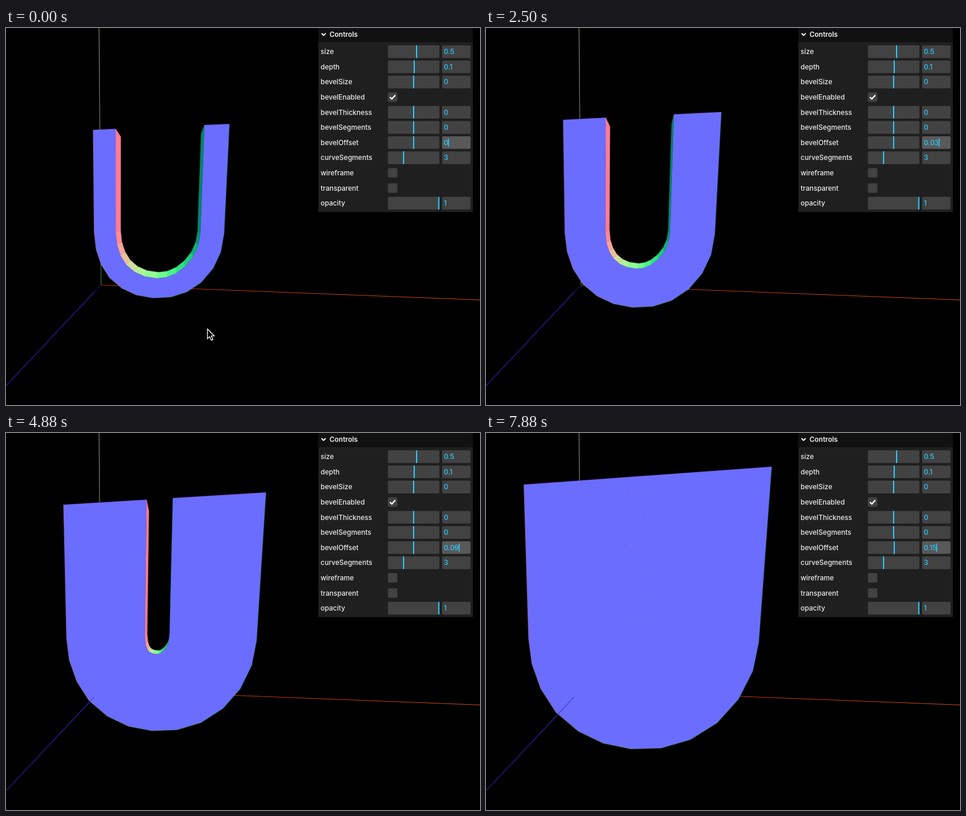
An HTML page with a canvas that plays this animation: 800 px wide and 637 px high, repeating every 8 s.

```html
<!DOCTYPE html>
<html lang="en">
<head>
<meta charset="utf-8">
<title>Bevel offset</title>
<style>
  html, body { margin: 0; width: 100%; height: 100%; overflow: hidden; background: #000; }
  canvas { display: block; }
</style>
</head>
<body>
<canvas id="stage" width="800" height="637"></canvas>
<script>
const ctx = document.getElementById('stage').getContext('2d');
const LOOP = 8000, FIRST_STEP = 1250, STEP = 441, DEPTH = 0.1;

// Camera: world axes and origin in view space (x right, y down, z away)
const AX = [0.986, 0.024, -0.165], AY = [0, -0.99, -0.1436], AZ = [-0.1635, 0.1417, -0.976];
const ORIGIN = [-0.0563, 0.096, 1.12], FOCAL = 537, CENTER = [187, 388];

function project([x, y], z) {
  const [a, b, c] = ORIGIN.map((o, i) => o + x * AX[i] + y * AY[i] + z * AZ[i]);
  return [CENTER[0] + FOCAL * a / c, CENTER[1] + FOCAL * b / c];
}

// Glyph outline, counter-clockwise, three segments per curve
const TOP = 0.4973;
const glyph = [[0.0022, TOP], [0.0022, 0.192]];
function curve(cx, cy, x, y) {
  const [px, py] = glyph[glyph.length - 1];
  for (let i = 1; i <= 3; i++) {
    const t = i / 3, s = 1 - t;
    glyph.push([s * s * px + 2 * s * t * cx + t * t * x, s * s * py + 2 * s * t * cy + t * t * y]);
  }
}
curve(0.0032, 0.105, 0.051, 0.048);
curve(0.106, -0.0095, 0.188, -0.011);
curve(0.276, -0.0125, 0.333, 0.045);
curve(0.391, 0.1055, 0.3917, 0.193);
glyph.push([0.3917, TOP]);
const INNER = glyph.length;
glyph.push([0.3246, TOP], [0.3246, 0.192]);
curve(0.3235, 0.134, 0.284, 0.092);
curve(0.246, 0.052, 0.2, 0.0515);
curve(0.138, 0.052, 0.1035, 0.0915);
curve(0.0715, 0.13, 0.0702, 0.192);
glyph.push([0.0702, TOP]);

const COUNT = glyph.length;
const normals = glyph.map(([x, y], i) => {
  const [nx, ny] = glyph[(i + 1) % COUNT];
  const len = Math.hypot(nx - x, ny - y);
  return [(ny - y) / len, (x - nx) / len];
});

function offsetGlyph(d) {
  return glyph.map(([x, y], i) => {
    const a = normals[(i + COUNT - 1) % COUNT], b = normals[i];
    const k = d / (1 + a[0] * b[0] + a[1] * b[1]);
    return [x + k * (a[0] + b[0]), y + k * (a[1] + b[1])];
  });
}

// View-space normal shown as a colour
function normalColor([x, y], sign) {
  const rgb = [0, 1, 2].map(i => {
    const v = (x * AX[i] + y * AY[i]) * sign * (i ? -1 : 1);
    return Math.round(127.5 + 127.5 * v);
  });
  return `rgb(${rgb})`;
}

function trace(points, close) {
  ctx.beginPath();
  points.forEach(p => ctx.lineTo(...p));
  if (close) ctx.closePath();
}

function line(from, to, width, color) {
  trace([from, to]);
  ctx.lineWidth = width;
  ctx.strokeStyle = color;
  ctx.stroke();
}

function axis(from, to, near, far) {
  const g = ctx.createLinearGradient(...from, ...to);
  g.addColorStop(0, near);
  g.addColorStop(1, far);
  line(from, to, 1, g);
}

function drawScene(d) {
  const zero = [160.5, 434.5], blueEnd = [0, 604.5];
  axis(zero, [800, 459.5], '#b02810', '#c9481c');
  axis(zero, [157, 0], '#3f8a2c', '#8fa283');
  axis(zero, blueEnd, '#2020a0', '#2626b4');

  const shape = offsetGlyph(d), closed = d > 0.127;
  const front = shape.map(p => project(p, DEPTH));
  const back = shape.map(p => project(p, 0));
  ctx.lineJoin = 'round';

  for (let i = 0; i < COUNT; i++) {
    const j = (i + 1) % COUNT;
    if (i < INNER || j === 0) {
      ctx.globalAlpha = 0.5;
      line(front[i], front[j], 1.4, normalColor(normals[i], -1));
      ctx.globalAlpha = 1;
    } else if (!closed) {
      trace([front[i], front[j], back[j], back[i]], true);
      ctx.fillStyle = ctx.strokeStyle = normalColor(normals[i], 1);
      ctx.lineWidth = 0.5;
      ctx.fill();
      ctx.stroke();
    }
  }

  trace(closed ? front.slice(0, INNER) : front, true);
  ctx.fillStyle = '#6b6dff';
  ctx.fill();

  // Specks where the overlapping inner walls touch the face
  if (closed) {
    ctx.setLineDash([2, 40]);
    ctx.lineDashOffset = -30;
    line(front[INNER], front[INNER + 1], 1, '#d87aa0');
    line(front[COUNT - 1], front[COUNT - 2], 1, '#d87aa0');
    ctx.setLineDash([]);
  }
  line(project([0, 0], DEPTH), blueEnd, 1, '#2626b4');
}

const BLUE = '#2cc9ff', GREY = '#424242';
const rows = [
  ['size', '0.5', 692], ['depth', '0.1', 688], ['bevelSize', '0', 687],
  ['bevelEnabled', true], ['bevelThickness', '0', 687], ['bevelSegments', '0', 687],
  ['bevelOffset', '', 687], ['curveSegments', '3', 670],
  ['wireframe', false], ['transparent', false], ['opacity', '1', 729.5]
];

function box(x, y, w, h, color) {
  ctx.fillStyle = color;
  ctx.beginPath();
  ctx.roundRect(x, y, w, h, 2);
  ctx.fill();
}

function text(str, x, y, color, weight = 500) {
  ctx.font = `${weight} 11.6px Inter, "Liberation Sans", sans-serif`;
  ctx.textBaseline = 'alphabetic';
  ctx.fillStyle = color;
  ctx.fillText(str, x, y + 4.2);
}

function stroke(points, width) {
  trace(points);
  ctx.lineWidth = width;
  ctx.strokeStyle = '#fff';
  ctx.stroke();
}

function drawPanel(d, caret) {
  ctx.fillStyle = '#1f1f1f';
  ctx.fillRect(527, 0, 261, 311);
  ctx.fillStyle = '#111';
  ctx.fillRect(527, 0, 261, 24);
  stroke([[532.5, 9], [536, 12.5], [539.5, 9]], 1.8);
  text('Controls', 546, 11, '#f2f2f2', 600);

  rows.forEach(([name, value, tick], i) => {
    const y = 40 + i * 25.6, active = name === 'bevelOffset';
    text(name, 531, y, '#ebebeb');
    if (typeof value === 'boolean') {
      box(644.5, y - 8, 16, 16, GREY);
      if (value) stroke([[648, y], [651.2, y + 3.2], [657, y - 3.4]], 2.2);
      return;
    }
    if (active) {
      value = String(d);
      tick = Math.round(686.95 + 4.3 * d);
    }
    box(644.5, y - 10.7, 87, 21.4, GREY);
    ctx.fillStyle = BLUE;
    ctx.fillRect(tick, y - 10.7, 2, 21.4);
    box(736, y - 10.7, 48, 21.4, active ? '#595959' : GREY);
    text(value, 739, y, BLUE);
    if (active && caret) {
      ctx.fillStyle = BLUE;
      ctx.fillRect(Math.round(738.5 + ctx.measureText(value).width), y - 7, 1.5, 14);
    }
  });
}

function drawPointer() {
  trace([[340, 508.5], [340, 525], [343.7, 521.5], [346.4, 527.6], [349.2, 526.4],
    [346.6, 520.4], [351.4, 520.2]], true);
  ctx.lineJoin = 'miter';
  ctx.lineWidth = 1.3;
  ctx.fillStyle = '#000';
  ctx.strokeStyle = '#fff';
  ctx.fill();
  ctx.stroke();
}

function draw(now) {
  const t = now % LOOP, typing = t >= FIRST_STEP;
  const d = typing ? (Math.floor((t - FIRST_STEP) / STEP) + 1) / 100 : 0;
  const offset = Math.min(d, 0.15);
  ctx.fillStyle = '#000';
  ctx.fillRect(0, 0, 800, 637);
  drawScene(offset);
  drawPanel(offset, typing || t % 1000 < 500);
  if (!typing) drawPointer();
  requestAnimationFrame(draw);
}
requestAnimationFrame(draw);
</script>
</body>
</html>
```
